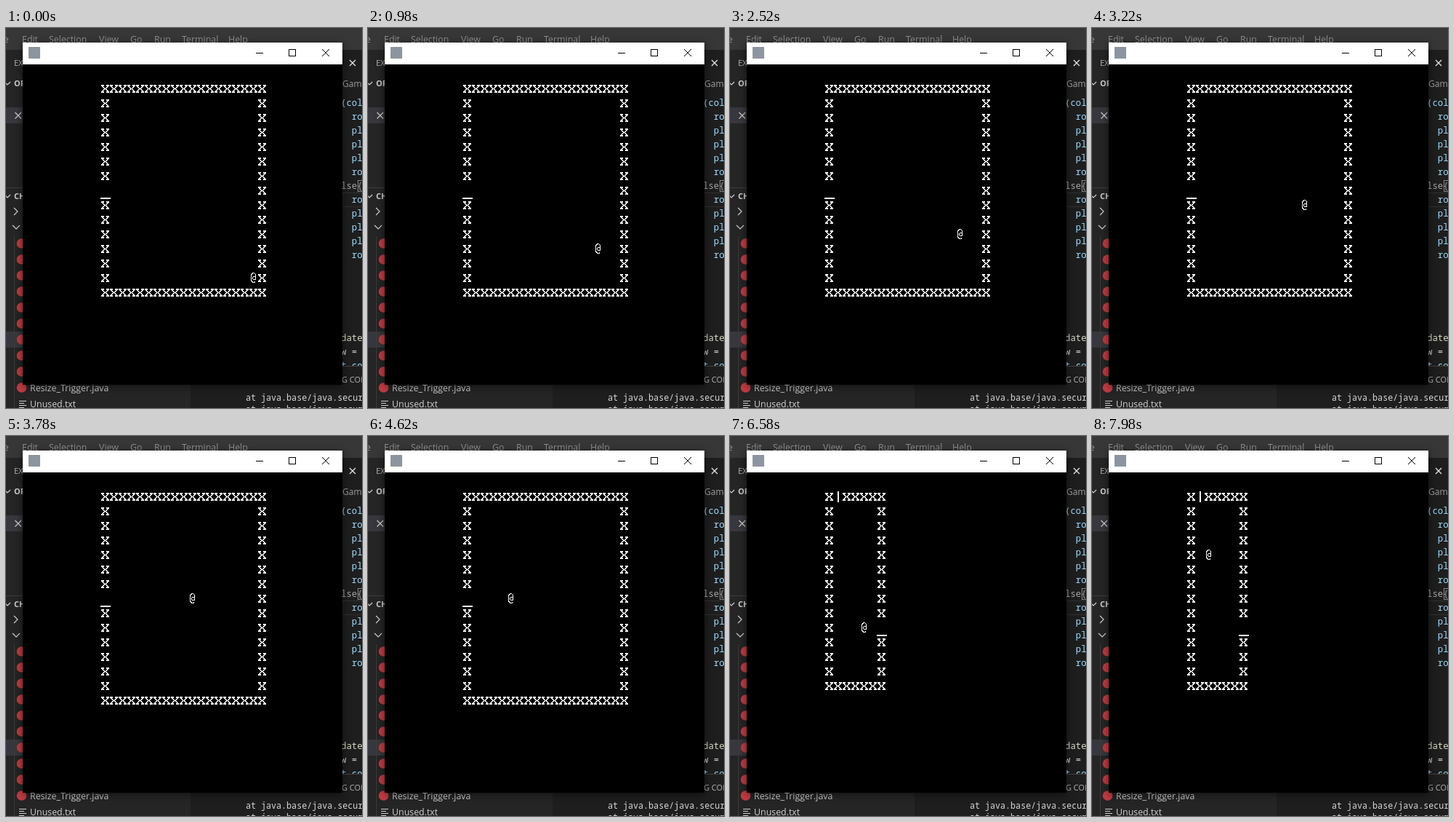
These frames come from a looping animation (490x522 px, 8000 ms). An HTML page:

```html
<!DOCTYPE html>
<html lang="en">
<head>
<meta charset="utf-8">
<title>Room crawler</title>
<style>
  html, body { margin: 0; width: 100%; height: 100%; overflow: hidden; background: #1e1e1e; }
  svg { display: block; }
  text { white-space: pre; }
  .ui { font: 12.4px "Open Sans", "Noto Sans", sans-serif; fill: #d0d0d0; }
  .menu { fill: #929292; }
  .small { font-size: 11px; fill: #b4b4b4; }
  .head { font-size: 11px; font-weight: 700; }
  .code { font: 500 12.4px "Noto Sans Mono", "DejaVu Sans Mono", monospace; }
  .log { font: 500 11.7px "Noto Sans Mono", "DejaVu Sans Mono", monospace; fill: #d8d8d8; }
  .line { fill: none; stroke: #cfcfcf; stroke-width: 1.2; }
  .crisp { shape-rendering: crispEdges; }
  .window { filter: drop-shadow(0 2px 6px rgba(0, 0, 0, .55)); }
</style>
</head>
<body>
<svg width="490" height="522" viewBox="0 0 490 522">
  <defs>
    <path id="wall" d="M0 0h4v2H0zM7 0h4v2H7zM0 9h4v2H0zM7 9h4v2H7zM.32 2H2.52L10.68 9H8.48zM8.48 2H10.68L2.52 9H.32z"/>
    <path id="sill" d="M-1 15h14v2H-1z"/>
    <path id="post" d="M5 -2h2v15H5z"/>
  </defs>

  <rect width="490" height="522" fill="#1e1e1e"/>
  <rect width="490" height="30" fill="#373737"/>
  <rect y="30" width="254" height="492" fill="#252526"/>
  <g id="menu"></g>

  <g id="side">
    <rect y="109" width="24" height="22" fill="#37373d"/>
    <rect y="417" width="24" height="22" fill="#37373d"/>
    <path class="crisp" d="M0 219.5H254" stroke="#3f3f40"/>
    <text class="ui small" x="11" y="52">EXPLORER</text>
    <text class="ui head" x="11" y="80">OPEN EDITORS</text>
    <text class="ui head" x="11" y="235">CHAMBERS</text>
    <path class="line" d="M-2 74L2 78L6 74M-2 229L2 233L6 229M12.5 116L21 124.5M21 116L12.5 124.5M11 247L16 252L11 257M9 271L14 276L19 271"/>
    <path class="crisp" d="M11.5 286V522" stroke="#3c3c3c"/>
    <g id="files" fill="#c23b41"></g>
    <text class="ui" x="33" y="499">Resize_Trigger.java</text>
    <text class="ui" x="33" y="521">Unused.txt</text>
    <path class="line crisp" d="M18 512.5H28M18 515.5H25M18 518.5H28M18 521.5H25"/>
  </g>

  <g id="editor">
    <rect x="463" y="30" width="27" height="36" fill="#1e1e1e"/>
    <path d="M473 44L481 52M481 44L473 52" stroke="#e6e6e6" stroke-width="1.3"/>
    <text class="ui" x="463" y="81" style="font-size:12px;fill:#a0a0a0">Game</text>
    <path class="crisp" d="M463 226.5H490M463 245.5H490" stroke="#303030"/>
    <rect class="crisp" x="484.5" y="209.5" width="8" height="15" fill="none" stroke="#888"/>
    <g id="code"></g>
    <path class="crisp" d="M254 464.5H490" stroke="#454545"/>
    <rect x="254" y="465" width="236" height="57" fill="#1e1e1e"/>
    <text class="ui small" x="462" y="487">G CONSOLE</text>
    <text class="log" x="330" y="512">at java.base/java.security</text>
    <text class="log" x="330" y="528">at java.base/java.security</text>
  </g>

  <g class="window">
    <rect x="23" y="20" width="440" height="470"/>
    <rect x="23" y="20" width="440" height="30" fill="#fff"/>
  </g>
  <rect x="31" y="26" width="16" height="16" fill="#8c959f"/>
  <g fill="none" stroke="#000">
    <path class="crisp" d="M344 34.5H354M389.5 29.5H398.5V38.5H389.5Z"/>
    <path d="M435 29L445 39M445 29L435 39"/>
  </g>

  <g class="crisp" fill="#fff">
    <g id="hall"></g>
    <g id="closet"></g>
  </g>
  <path id="hero" class="crisp" fill="none" stroke="#fff"
    d="M6 12L5 13.5H3L.5 11V3L3 .5H4.5L6.5 2.5V9.5H4L2.5 8.5V6.5L4 5H6.5"/>
</svg>

<script>
const LOOP = 8000, STEP = 140;
const CELL_W = 12, CELL_H = 20, LEFT = 131, TOP = 78;
const byId = id => document.getElementById(id);

function add(parent, tag, attrs, text = '') {
  const el = document.createElementNS('http://www.w3.org/2000/svg', tag);
  for (const key in attrs) el.setAttribute(key, attrs[key]);
  el.textContent = text;
  byId(parent).append(el);
}

// Editor behind the game window
const menu = [['File', -16], ['Edit', 22], ['Selection', 59], ['View', 128],
  ['Go', 171], ['Run', 204], ['Terminal', 242], ['Help', 306]];
for (const [word, x] of menu) add('menu', 'text', { class: 'ui menu', x, y: 19.5 }, word);

for (let y = 296; y < 500; y += 22) add('files', 'circle', { cx: 21.5, cy: y, r: 6.8 });

const lines = ['(col', '  row', '  pla', '  pla', '  pla', '  row', 'lse{',
  '  row', '  pla', '  pla', '  pla', '  row'];
const tints = { 'lse{': '#aaa3a9', 'date': '#d8d8c4', 'w =': '#d4d4d4' };
const codeLine = (text, y) =>
  add('code', 'text', { class: 'code', x: 461, y, fill: tints[text] || '#9cdcfe' }, text);
lines.forEach((text, i) => codeLine(text, 107 + i * 19));
['date', 'w =', 't col'].forEach((text, i) => codeLine(text, 430 + i * 19));

// Rooms: a ring of walls with doors cut into it
function buildRoom(id, cols, rows, doors) {
  for (let r = 0; r < rows; r++) {
    for (let c = 0; c < cols; c++) {
      if (r % (rows - 1) && c % (cols - 1)) continue;
      const shape = doors[`${c},${r}`] || 'wall';
      add(id, 'use', { href: '#' + shape, x: LEFT + c * CELL_W, y: TOP + r * CELL_H });
    }
  }
}
buildRoom('hall', 19, 15, { '0,7': 'sill' });
buildRoom('closet', 7, 14, { '6,9': 'sill', '1,0': 'post' });

// Each walk: start time and one move per step
const rooms = [
  { id: 'hall', from: 0, start: [17, 13], walks: [
    [280, 'U'], [560, 'U'], [840, 'LL'], [1260, 'U'], [1540, 'R'], [1820, 'R'],
    [2380, 'LL'], [2800, 'UULL'], [3500, 'U'], [3500, 'LLLLLL'], [4480, 'LL'],
    [4900, 'LLL'], [5600, 'L']] },
  { id: 'closet', from: 5880, start: [5, 9], walks: [
    [6580, 'L'], [6860, 'UUL'], [7560, 'UUUL']] }
];
const dirs = { U: [0, -1], L: [-1, 0], R: [1, 0] };

function heroCell(room, t) {
  let [c, r] = room.start;
  for (const [begin, moves] of room.walks) {
    [...moves].forEach((move, i) => {
      if (t < begin + i * STEP) return;
      c += dirs[move][0];
      r += dirs[move][1];
    });
  }
  return [c, r];
}

function draw(t) {
  const room = t < rooms[1].from ? rooms[0] : rooms[1];
  for (const { id } of rooms) byId(id).style.display = id === room.id ? '' : 'none';
  const [c, r] = heroCell(room, t);
  byId('hero').setAttribute('transform',
    `translate(${LEFT + 2 + c * CELL_W} ${TOP - 2 + r * CELL_H})`);
}

const t0 = performance.now();
function tick(now) {
  draw(Math.max(0, now - t0) % LOOP);
  requestAnimationFrame(tick);
}
draw(0);
requestAnimationFrame(tick);
</script>
</body>
</html>
```
